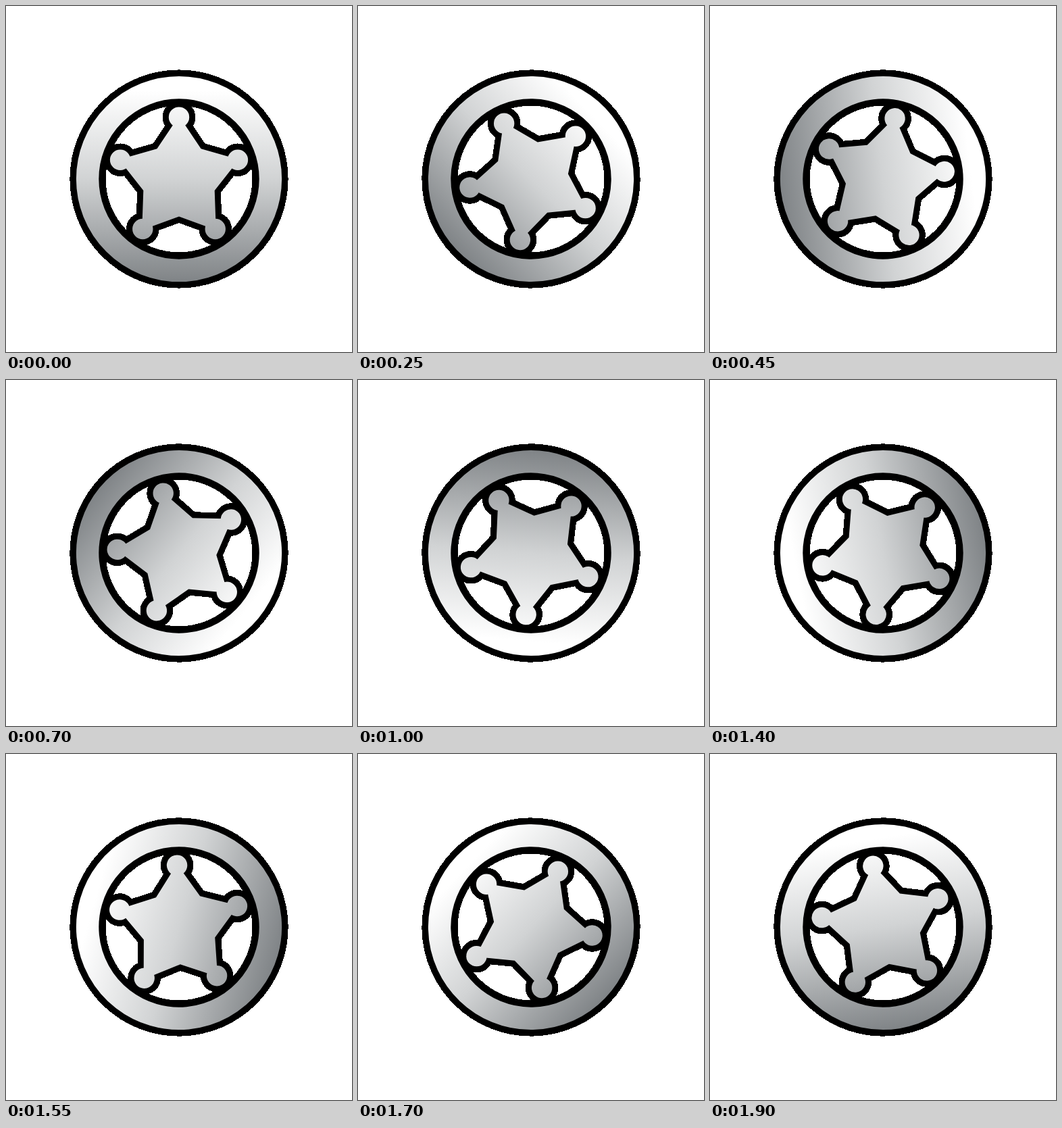
These frames come from a looping animation (512 by 512 pixels, 1.95 s). An HTML page:

```html
<!DOCTYPE html>
<html lang="en">
<head>
<meta charset="utf-8">
<title>Spinning badge</title>
<style>
  html, body { margin: 0; width: 100%; height: 100%; overflow: hidden; background: #fff; }
  svg { display: block; width: 100%; height: 100%; }
  .line { fill: none; stroke: #000; shape-rendering: crispEdges; }
</style>
</head>
<body>
<svg viewBox="-256 -256 512 512">
  <defs>
    <linearGradient id="metal" gradientUnits="userSpaceOnUse" x1="0" y1="-152" x2="0" y2="152">
      <stop offset=".07" stop-color="#fff"/>
      <stop offset=".5" stop-color="#d1d3d4"/>
      <stop offset="1" stop-color="#808487"/>
    </linearGradient>
    <g id="star"></g>
  </defs>
  <g id="badge">
    <circle class="line" r="135" stroke-width="53.2"/>
    <circle r="135.4" fill="none" stroke="url(#metal)" stroke-width="33.4"/>
    <use class="line" href="#star" stroke-width="18.2"/>
    <use href="#star" fill="url(#metal)"/>
  </g>
</svg>
<script>
  const LOOP = 1950, STEP = 50;
  const TIP = 93.2, NOTCH = 55.4, BALL_AT = 91.4, BALL = 15.2;
  const badge = document.getElementById('badge');

  // Point at a clockwise angle from the top.
  const polar = (r, deg) => {
    const a = deg * Math.PI / 180;
    return [r * Math.sin(a), -r * Math.cos(a)];
  };

  const points = [];
  let balls = '';
  for (let a = 0; a < 360; a += 72) {
    points.push(polar(TIP, a), polar(NOTCH, a + 36));
    const [x, y] = polar(BALL_AT, a);
    balls += `<circle cx="${x}" cy="${y}" r="${BALL}"/>`;
  }
  document.getElementById('star').innerHTML = `<polygon points="${points.join(' ')}"/>${balls}`;

  function draw() {
    const t = Math.floor(performance.now() % LOOP / STEP) * STEP;
    badge.setAttribute('transform', `rotate(${360 * t / LOOP})`);
    requestAnimationFrame(draw);
  }
  draw();
</script>
</body>
</html>
```
